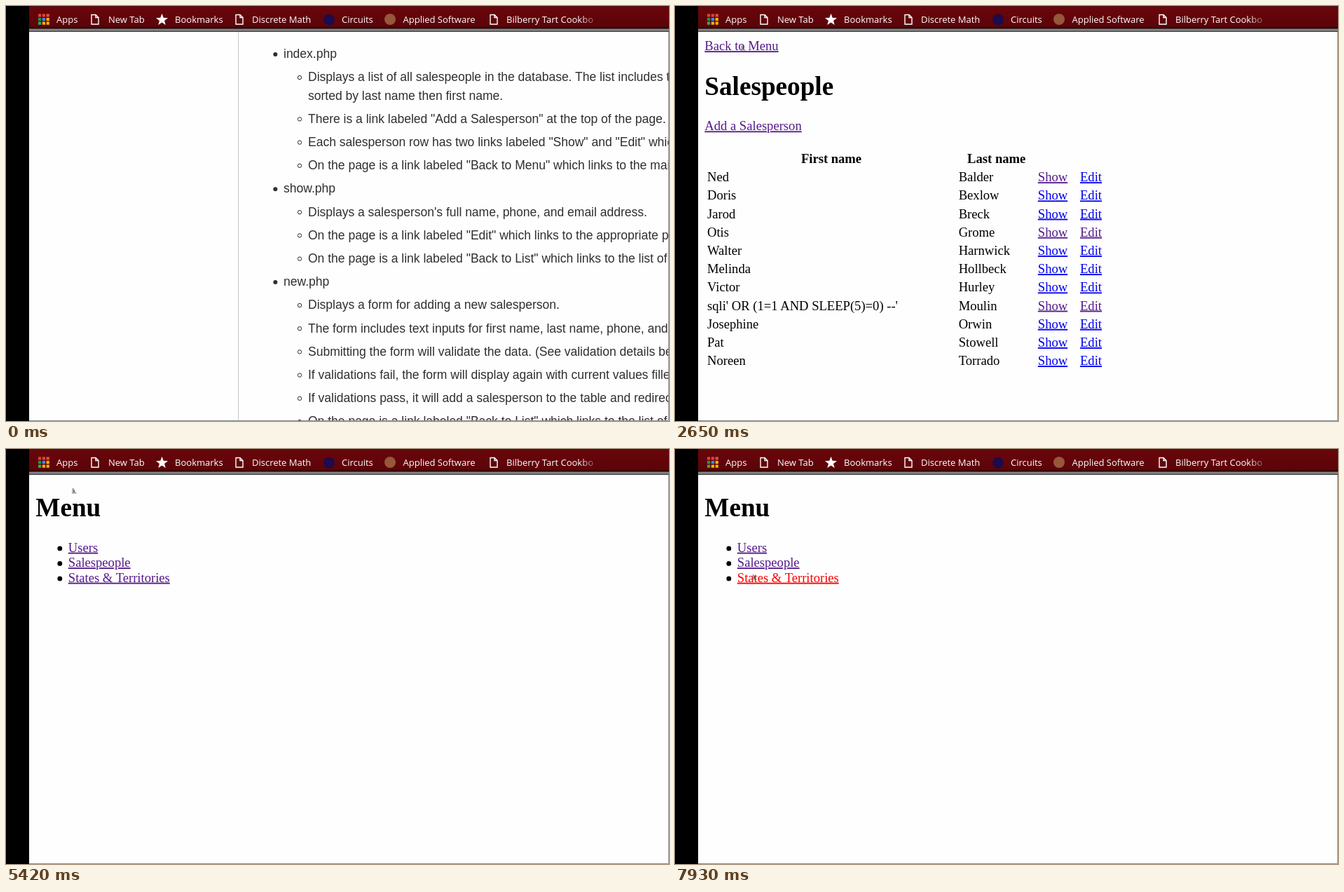
Animation, 946 px wide and 592 px high, one loop 8 s. Source, as an HTML page:

```html
<!DOCTYPE html>
<html lang="en">
<head>
<meta charset="utf-8">
<title>Salespeople walkthrough</title>
<style>
  html, body { margin: 0; width: 100%; height: 100%; overflow: hidden; background: #000; }
  svg { display: block; width: 946px; height: 592px; }
  text { white-space: pre; }
  .bar { font: 13px "Open Sans", "Noto Sans", sans-serif; fill: #fff; }
  .doc { font: 17.5px "Liberation Sans", Arial, sans-serif; fill: #2f2f33; }
  .web { font: 18.6px "Liberation Serif", "Times New Roman", serif; fill: #000; }
  .title { font-size: 37.2px; font-weight: bold; }
  .head { font-weight: bold; text-anchor: middle; }
  .link { fill: #00e; text-decoration: underline; text-decoration-skip-ink: none; }
  .seen { fill: #551a8b; }
</style>
</head>
<body>
<svg viewBox="0 0 946 592">
  <defs>
    <linearGradient id="red" x2="0" y2="1">
      <stop offset="0" stop-color="#4c1014"/>
      <stop offset=".08" stop-color="#68060b"/>
      <stop offset=".9" stop-color="#5c0409"/>
      <stop offset="1" stop-color="#2c0204"/>
    </linearGradient>
    <linearGradient id="fade" gradientUnits="userSpaceOnUse" x1="818" x2="848">
      <stop offset="0" stop-color="#fff"/>
      <stop offset="1" stop-color="#fff" stop-opacity="0"/>
    </linearGradient>
  </defs>
  <rect x="33" y="36" width="913" height="556" fill="#fefefe"/>
  <g id="doc" class="doc"><path d="M331.5 36V592" stroke="#c7cdd1"/></g>
  <g id="people" class="web"></g>
  <g id="menu" class="web"></g>
  <path d="M945.5 36V591.5H33" fill="none" stroke="#8a8a8a"/>
  <g id="bar" class="bar">
    <rect x="33" width="913" height="32" fill="url(#red)"/>
    <rect x="33" y="32" width="913" height="5" fill="#4a4a4a"/>
    <rect x="33" y="33" width="913" height="2.5" fill="#858585"/>
  </g>
  <path id="arrow" d="M.4.6V9.6L2.4 7.8 3.8 10.7 5 10.1 3.7 7.2H6.6Z" fill="#fff" stroke="#222" stroke-width=".7"/>
  <g id="hand" fill="#fff" stroke="#444" stroke-width=".75" stroke-linejoin="round">
    <path d="M3 8V1.5Q3-.1 4.1.5 4.7.8 4.7 1.8V5Q6-.2+5.3 6.2 5.2Q7.6 5 7.8 5.8 9.4 5.8 9.5 7.2V9.6Q9.4 11 8.6 12V13.6H3.8V12.4Q2 10.6.7 8.4.4 7.1 1.6 7.2Z"/>
    <path d="M4.7 5V7.4M6.3 5.3V7.5M7.9 5.9V7.7" fill="none"/>
  </g>
</svg>
<script>
const DURATION = 8000;
const byId = id => document.getElementById(id);

function add(parent, tag, attrs, content = "") {
  const node = document.createElementNS("http://www.w3.org/2000/svg", tag);
  for (const key in attrs) node.setAttribute(key, attrs[key]);
  node.textContent = content;
  byId(parent).append(node);
  return node;
}
const write = (parent, x, y, content, cls = "") => add(parent, "text", { x, y, class: cls }, content);
const dot = (parent, cx, cy, r, fill) => add(parent, "circle", { cx, cy, r, fill });

// Bookmark bar
const sheet = x => add("bar", "path", {
  d: `M${x} 12.5h6l4 4v9.5h-10zM${x + 6} 12.5v4h4`, fill: "none", stroke: "#fff", "stroke-width": 1.4
});
const appColors = ["#db4437", "#db4437", "#e0533a", "#0f9d58", "#4285f4", "#f4b400", "#3fa858", "#f4b400", "#f4b400"];
appColors.forEach((fill, i) => add("bar", "rect", {
  x: 46 + i % 3 * 5.8, y: 11.3 + Math.floor(i / 3) * 5.6, width: 4.2, height: 4.2, fill
}));
[122, 328, 691].forEach(sheet);
const star = Array.from({ length: 10 }, (_, i) => {
  const angle = i * Math.PI / 5, r = i % 2 ? 3.7 : 9;
  return [222.5 + r * Math.sin(angle), 19.8 - r * Math.cos(angle)];
});
add("bar", "polygon", { points: star.join(" "), fill: "#fff" });
dot("bar", 461, 19.5, 8, "#1f0a4a");
dot("bar", 548, 19, 8, "#96573a");
[[72, "Apps"], [146, "New Tab"], [241, "Bookmarks"], [351, "Discrete Math"], [479, "Circuits"],
 [566.5, "Applied Software"]].forEach(([x, label]) => write("bar", x, 24, label));
write("bar", 714, 24, "Bilberry Tart Cookbo").style.fill = "url(#fade)";

// Assignment text: "*" heading, "-" item, " " continued line
const notes = `*index.php
-Displays a list of all salespeople in the database. The list includes their names,
 sorted by last name then first name.
-There is a link labeled "Add a Salesperson" at the top of the page.
-Each salesperson row has two links labeled "Show" and "Edit" which link
-On the page is a link labeled "Back to Menu" which links to the main menu.
*show.php
-Displays a salesperson's full name, phone, and email address.
-On the page is a link labeled "Edit" which links to the appropriate page.
-On the page is a link labeled "Back to List" which links to the list of salespeople.
*new.php
-Displays a form for adding a new salesperson.
-The form includes text inputs for first name, last name, phone, and email.
-Submitting the form will validate the data. (See validation details below.)
-If validations fail, the form will display again with current values filled in.
-If validations pass, it will add a salesperson to the table and redirect
-On the page is a link labeled "Back to List" which links to the list of salespeople.`;
let y = 41;
for (const line of notes.split("\n")) {
  const mark = line[0];
  y += mark === " " ? 26.2 : 33.2;
  write("doc", mark === "*" ? 396 : 431, y, line.slice(1));
  if (mark === "*") dot("doc", 384.3, y - 5.2, 3, "#2f2f33");
  if (mark === "-") add("doc", "circle", { cx: 419, cy: y - 5.4, r: 2.7, fill: "none", stroke: "#2f2f33" });
}

// Salespeople table
const backLink = write("people", 42.3, 63.2, "Back to Menu", "link seen");
write("people", 42.3, 126.6, "Salespeople", "title");
write("people", 42.3, 177.4, "Add a Salesperson", "link seen");
write("people", 223, 224, "First name", "head");
write("people", 458.7, 224, "Last name", "head");
const people = [
  ["Ned", "Balder", "show"], ["Doris", "Bexlow"], ["Jarod", "Breck"], ["Otis", "Grome", "show edit"],
  ["Walter", "Harnwick"], ["Melinda", "Hollbeck"], ["Victor", "Hurley"],
  ["sqli' OR (1=1 AND SLEEP(5)=0) --'", "Moulin", "show edit"],
  ["Josephine", "Orwin"], ["Pat", "Stowell"], ["Noreen", "Torrado"]
];
people.forEach(([first, last, visited = ""], i) => {
  const base = 250.2 + i * 26.2;
  const linkClass = name => visited.includes(name) ? "link seen" : "link";
  write("people", 46, base, first);
  write("people", 404.7, base, last);
  write("people", 517.8, base, "Show", linkClass("show"));
  write("people", 578, base, "Edit", linkClass("edit"));
});

// Menu
write("menu", 42.3, 95.8, "Menu", "title");
const menuLinks = ["Users", "Salespeople", "States & Territories"].map((label, i) => {
  const base = 146.7 + i * 21.5;
  dot("menu", 76.8, base - 4.8, 3.4, "#000");
  return write("menu", 88.8, base, label, "link seen");
});

// Each step is [start time, properties]; values hold until the next step.
function play(node, steps) {
  const frames = steps.map(([time, props]) => ({ offset: time / DURATION, easing: "steps(1, end)", ...props }));
  frames.push({ ...frames[frames.length - 1], offset: 1 });
  node.animate(frames, { duration: DURATION, iterations: Infinity });
}
const show = on => ({ visibility: on ? "visible" : "hidden" });
const VISITED = { fill: "#551a8b" }, ACTIVE = { fill: "#f00" };

play(byId("doc"), [[0, show(true)], [460, show(false)]]);
play(byId("people"), [[0, show(false)], [460, show(true)], [5420, show(false)]]);
play(byId("menu"), [[0, show(false)], [5420, show(true)]]);
play(backLink, [[0, VISITED], [4080, ACTIVE], [4200, VISITED]]);
play(menuLinks[2], [[0, VISITED], [7930, ACTIVE]]);

const pointer = [
  [0, "none", 404, 31],
  [1310, "arrow", 404, 31], [1450, "arrow", 429, 17], [1570, "arrow", 260, 106],
  [1720, "hand", 86, 65], [2250, "hand", 87, 62], [2370, "hand", 89, 59], [2490, "hand", 91, 57],
  [2650, "hand", 92, 56],
  [5980, "arrow", 109, 71], [6120, "arrow", 145, 139],
  [6260, "hand", 113, 138], [6410, "hand", 110, 138],
  [7220, "hand", 110, 150], [7340, "hand", 110, 168], [7500, "hand", 110, 176], [7650, "hand", 108, 179]
];
for (const kind of ["arrow", "hand"]) {
  play(byId(kind), pointer.map(([time, shape, x, y]) =>
    [time, { ...show(shape === kind), transform: `translate(${x}px, ${y}px)` }]));
}
</script>
</body>
</html>
```
